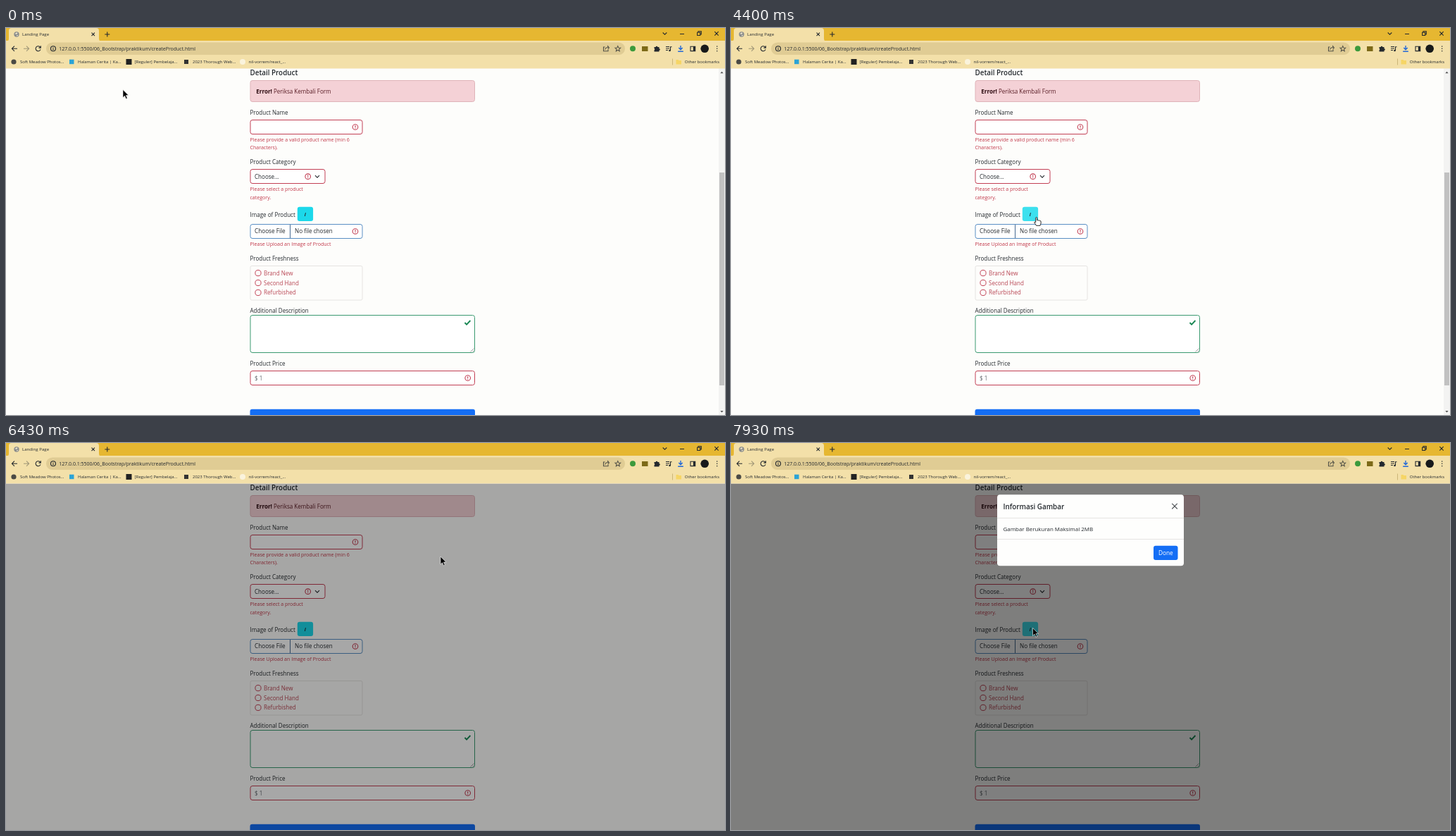
Animation, 1021 px wide and 549 px high, one loop 8 s. Source, as an HTML page:

```html
<!DOCTYPE html>
<html lang="id">
<head>
<meta charset="utf-8">
<title>Landing Page</title>
<style>
html, body { margin: 0; height: 100%; overflow: hidden; background: #fdfdfb; }
svg { display: block; width: 100vw; height: 100vh; font: 8.05px "Open Sans", "Noto Sans", sans-serif; fill: #24292e; }
.line { fill: none; stroke: #24292e; stroke-width: 1.1; }
.chrome { font-size: 6px; }
.h { font-size: 9.85px; font-weight: 600; }
.err { font-size: 7.06px; fill: #c2384a; }
.red { fill: #b94654; }
.bad { fill: none; stroke: #c23f54; }
.field { fill: #fff; }
.thin { fill: none; stroke: #e6e4e2; }
</style>
</head>
<body>
<svg viewBox="0 0 1021 549">
  <defs>
    <clipPath id="view"><path d="M0 57.5H1021V549H0z"/></clipPath>
    <g id="warn">
      <circle r="3.8" class="bad" stroke-width="1.1"/>
      <path d="M0-2.2V.5M0 1.2V2.2" class="bad" stroke-width="1.1"/>
    </g>
    <circle id="radio" r="4.1" class="bad"/>
  </defs>

  <g id="page">
    <path d="M0 57H1021V549H0z" fill="#fdfdfb"/>
    <text x="346.5" y="67.4" class="h">Detail Product</text>
    <rect x="347" y="74.5" width="318.5" height="30" rx="3" fill="#f4d1d6" stroke="#dfb3b8"/>
    <text x="355.3" y="92.7" fill="#581c24"><tspan font-weight="700" fill="#2e0a10">Error!</tspan> Periksa Kembali Form</text>

    <text x="346.5" y="123">Product Name</text>
    <rect x="347" y="130.5" width="159" height="20" rx="3" class="bad field"/>
    <use href="#warn" x="496" y="140.5"/>
    <text x="346.5" y="161.2" class="err">Please provide a valid product name (min 6</text>
    <text x="346.5" y="172.4" class="err">Characters).</text>

    <text x="346.5" y="193">Product Category</text>
    <rect x="347" y="200.5" width="106" height="20" rx="3" class="bad field"/>
    <text x="353" y="213.8">Choose...</text>
    <use href="#warn" x="428.7" y="210.7"/>
    <path d="M439 209.2l3 3 3-3" class="line"/>
    <text x="346.5" y="231.4" class="err">Please select a product</text>
    <text x="346.5" y="242.6" class="err">category.</text>

    <text x="346.5" y="268">Image of Product</text>
    <rect id="info" x="413.8" y="253.7" width="22.3" height="20.3" rx="3"/>
    <text x="424.8" y="267" text-anchor="middle" font-size="7" font-weight="700" font-style="italic">i</text>
    <rect x="347" y="278.5" width="159" height="20" rx="3" fill="#fff" stroke="#5a8fc4"/>
    <path d="M403.5 279V298" stroke="#476a92"/>
    <text x="353" y="291.4" font-size="8.2">Choose File</text>
    <text x="410" y="291.4" font-size="8.15">No file chosen</text>
    <use href="#warn" x="496" y="288.5"/>
    <text x="346.5" y="309.2" class="err">Please Upload an Image of Product</text>

    <text x="346.5" y="330">Product Freshness</text>
    <rect x="347" y="337.5" width="159" height="48.5" rx="2" class="thin"/>
    <use href="#radio" x="358" y="347.6"/><text x="366" y="350.6" class="red">Brand New</text>
    <use href="#radio" x="358" y="361.5"/><text x="366" y="364.5" class="red">Second Hand</text>
    <use href="#radio" x="358" y="375.4"/><text x="366" y="378.4" class="red">Refurbished</text>

    <text x="346.5" y="404.3">Additional Description</text>
    <rect x="347" y="407.5" width="318.5" height="53" rx="3" fill="#fff" stroke="#3b9a70"/>
    <path d="M651.5 418l2.6 2.6 5.3-5.6" fill="none" stroke="#198754" stroke-width="1.9"/>
    <path d="M659.5 459.5l5-5M662.5 459.5l2-2" stroke="#777" stroke-width=".7"/>

    <text x="346.5" y="479">Product Price</text>
    <rect x="347" y="486.5" width="318.5" height="20" rx="3" class="bad field"/>
    <text x="353" y="499.6" fill="#666b70">$ 1</text>
    <use href="#warn" x="655.7" y="496.5"/>
    <rect x="346.5" y="540.7" width="319.5" height="20" rx="3" fill="#146ef5"/>
  </g>

  <g id="scroll">
    <path d="M1012 57H1021V549H1012z" fill="#f3f3f2"/>
    <path d="M1013 205H1020V507H1013z" fill="#c1c1c1"/>
    <path d="M1014.3 64.3h4.4l-2.2-2.5zM1014.3 543h4.4l-2.2 2.5z" fill="#555"/>
  </g>

  <g clip-path="url(#view)">
    <path id="shade" d="M0 57H1021V549H0z" fill="#000"/>
    <g id="modal">
      <rect x="378" y="73.2" width="265" height="101" rx="4" fill="#fefefd"/>
      <path d="M378 106.5H643M378 136.5H643" class="thin"/>
      <text x="386.5" y="93.9" class="h">Informasi Gambar</text>
      <path d="M626.2 85.9l7.6 7.6M633.8 85.9l-7.6 7.6" class="line" stroke-width="1" opacity=".8"/>
      <text x="386.5" y="125" font-size="7.95">Gambar Berukuran Maksimal 2MB</text>
      <rect x="600" y="145.8" width="34.5" height="20.2" rx="3" fill="#146ef5"/>
      <text x="617.3" y="159" text-anchor="middle" font-size="8.3" fill="#fff">Done</text>
    </g>
  </g>

  <g class="chrome">
    <path d="M0 0H1021V19H0z" fill="#e6b731"/>
    <path d="M0 18H1021V57.5H0z" fill="#f3e0a9"/>
    <path d="M1 18.5Q4 18.5 4 15V4Q4 0 8 0H128Q132 0 132 4V15Q132 18.5 135 18.5z" fill="#f3e0a9"/>
    <circle cx="15" cy="9" r="3.7" fill="#8b8d8c"/>
    <path d="M12.5 8l3-2 1 2-2 1zM15 10h2.5l-2 2z" fill="#e6dfc6"/>
    <text x="23" y="11.3" font-size="6.1">Landing Page</text>
    <path d="M121.5 6.7l4.5 4.5M126 6.7l-4.5 4.5M140.3 9h7M143.8 5.5v7" class="line"/>
    <path d="M932.7 6.5l2.8 2.8 2.8-2.8M957 8.5h6M981.7 6.2h4v4.3h-4zM983 6v-1.2h4.3V9h-1M1006.3 5.2l5.4 5.4M1011.7 5.2l-5.4 5.4" class="line" stroke-width=".9"/>

    <path d="M8.5 29.3H16M12 25.7l-3.6 3.6 3.6 3.6" class="line" stroke-width="1.2"/>
    <path d="M25 29.3h7.5M29 25.7l3.6 3.6-3.6 3.6" class="line" stroke-width="1.2" opacity=".4"/>
    <path d="M48.6 27.3a3.5 3.5 0 1 0 .4 3M49.3 25.3v2.8h-2.8" class="line" stroke-width="1.2"/>
    <rect x="57" y="20.5" width="822" height="17.5" rx="8.75" fill="#e0cc94"/>
    <circle cx="67" cy="29.3" r="3.5" class="line" stroke-width=".9"/>
    <path d="M67 27.2v1M67 28.9v2.4" class="line" stroke-width=".9"/>
    <text x="75.3" y="32" font-size="6.97">127.0.0.1:5500/06_Bootstrap/praktikum/createProduct.html</text>
    <path d="M850.5 27h-2v5.7h6.5v-2M850.7 30.7q.5-3 4-3.2v-1.7l1.7 2.3-1.7 2M868.8 25.6l1.1 2.5 2.7.2-2 1.8.6 2.7-2.4-1.5-2.4 1.5.6-2.7-2-1.8 2.7-.2z" class="line" stroke-width=".8" opacity=".75"/>
    <circle cx="890" cy="29.3" r="4" fill="#3c9a3c"/>
    <rect x="903" y="26" width="8.5" height="7" fill="#7d6a18"/>
    <path d="M920.5 27h2.2a1.3 1.3 0 0 1 2.6 0h2.2v2.2a1.3 1.3 0 0 1 0 2.6v1.7h-7v-2.2a1.2 1.2 0 0 0 0-2.2z"/>
    <path d="M937 26.5h5M937 29h5M937 31.5h3M943.5 32v-5.3h2" class="line"/>
    <circle cx="942.5" cy="32" r="1.3"/>
    <path d="M958 25v5.5M955.3 28l2.7 2.8 2.7-2.8M954.2 33.3h7.6" fill="none" stroke="#2268d8" stroke-width="1.4"/>
    <path d="M972 26.3h6.7v6.3H972z" class="line"/><path d="M975.8 26h3v6.6h-3z"/>
    <circle cx="992.2" cy="29.3" r="5.8" fill="#17191a"/>
    <path d="M1009 25.5h1.3v1.3h-1.3zM1009 28.7h1.3V30h-1.3zM1009 31.9h1.3v1.3h-1.3z"/>

    <circle cx="11" cy="48" r="3.6" fill="#4a4a45"/><text x="20" y="50.2">Soft Meadow Photos...</text>
    <rect x="90" y="44.7" width="6.5" height="6.5" fill="#2ba3d6"/><text x="102" y="50.2">Halaman Cerita | Ka...</text>
    <rect x="170.5" y="44" width="8" height="8" fill="#222"/><text x="182.5" y="50.2">[Reguler] Pembelaja...</text>
    <rect x="253" y="45" width="6" height="6" fill="#333"/><text x="265" y="50.2">2023 Thorough Web...</text>
    <circle cx="336" cy="48" r="4" fill="#faf3dc"/><text x="344.5" y="50.2">nil-vorrem/react_...</text>
    <path d="M946.5 43.5V52.5" stroke="#cbb679"/>
    <path d="M951.5 45h3l1 1h3.5v5.5h-7.500z" fill="#f6d565"/>
    <text x="963.8" y="50.2">Other bookmarks</text>
  </g>

  <path id="arrow" d="M0 0V11.2L2.6 8.800 4.400 13 6.300 12.200 4.500 8.100H8z" fill="#000" stroke="#fff" stroke-width=".6"/>
  <path id="hand" d="M-1 .8Q0-.6 1 .8V4.500Q2.300 3.600 3 4.800 4.300 4 5 5.300 6.400 4.900 6.400 6.500V8.500Q6 10.500 5.300 12H-.2Q-1.200 10-3 7.800-3.300 6.200-1 7.300z" fill="#fff" stroke="#111" stroke-width=".9"/>
</svg>
<script>
const LOOP = 8000;
const el = id => document.getElementById(id);
const ramp = (t, start, length) => Math.min(1, Math.max(0, (t - start) / length));
const smooth = p => p * p * (3 - 2 * p);
const easeOut = p => 1 - (1 - p) ** 2;

// Pointer moves: start, end, destination x, y
const start = [166, 87.5];
const moves = [
  [30, 400, 300, 180], [760, 1060, 392, 232], [1800, 2300, 440.5, 270.5],
  [2800, 2930, 433.7, 268.3], [4400, 4520, 428.5, 265],
  [5600, 5760, 617, 161], [6900, 7100, 430, 264], [7360, 7480, 428.5, 262.3]
];

function pointer(t) {
  let [x, y] = start;
  for (const [from, to, nx, ny] of moves) {
    const p = smooth(ramp(t, from, to - from));
    x += (nx - x) * p;
    y += (ny - y) * p;
  }
  return [x, y];
}

function draw(t) {
  const shade = ramp(t, 4560, 150) - ramp(t, 6400, 100) + ramp(t, 7510, 130);
  const slide = easeOut(ramp(t, 4710, 300)) - easeOut(ramp(t, 6100, 300)) + easeOut(ramp(t, 7630, 290));
  const fade = ramp(t, 4710, 150) - ramp(t, 6100, 150) + ramp(t, 7630, 150);
  const settle = t < 5400 ? -.7 : 0;
  el('shade').setAttribute('opacity', shade / 2);
  el('scroll').setAttribute('visibility', shade > 0 ? 'hidden' : 'visible');
  el('modal').setAttribute('opacity', fade);
  el('modal').setAttribute('transform', `translate(0 ${27 * (slide - 1) + settle})`);

  const [x, y] = pointer(t);
  const onInfo = x > 414 && x < 443 && y > 254 && y < 275;
  const onDone = x > 600 && x < 634 && y > 145 && y < 166 && fade > 0;
  const blocked = (t > 4530 && t < 6500) || t > 7490;
  const hand = onDone || (onInfo && !blocked);
  el('info').setAttribute('fill', onInfo ? '#3de0ee' : '#1cd8ea');
  for (const id of ['arrow', 'hand']) {
    el(id).setAttribute('transform', `translate(${x} ${y})`);
    el(id).setAttribute('visibility', (id === 'hand') === hand ? 'visible' : 'hidden');
  }
}

function tick() {
  draw(performance.now() % LOOP);
  requestAnimationFrame(tick);
}
tick();
</script>
</body>
</html>
```
